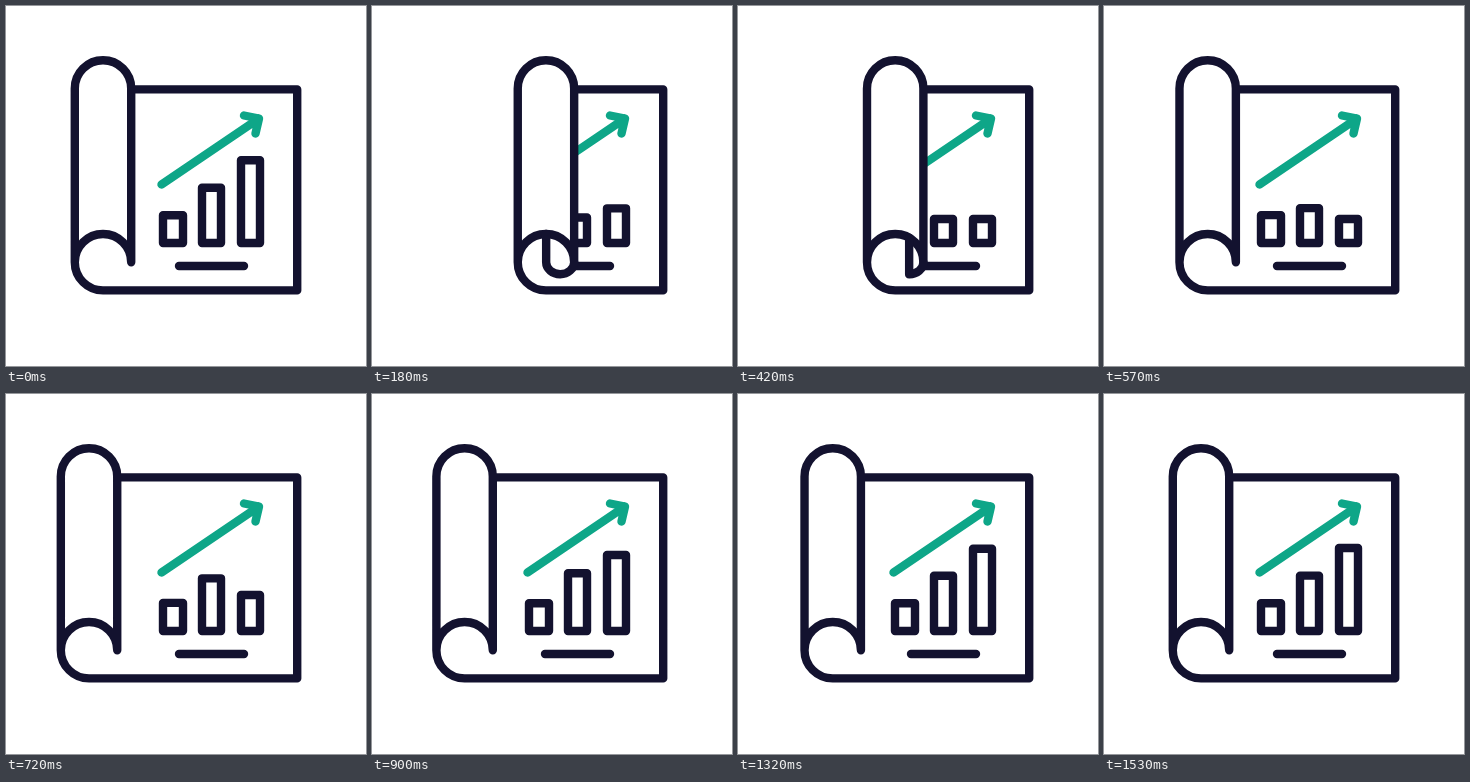
Recreate the animation shown at these times as an HTML page. Size 360 by 360 pixels, loop 1560 ms.

```html
<!DOCTYPE html>
<html lang="en">
<head>
<meta charset="utf-8">
<title>Chart scroll</title>
<style>
  html, body { margin: 0; width: 100%; height: 100%; overflow: hidden; background: #fff; }
  svg { display: block; width: 100vw; height: 100vh; }
  .ink { fill: none; stroke: #13122f; stroke-width: 8.4; stroke-linecap: round; stroke-linejoin: round; }
  .accent { stroke: #0ea688; }
</style>
</head>
<body>
<svg viewBox="0 0 360 360">
  <clipPath id="page"><rect id="reveal" y="0" width="360" height="360"/></clipPath>
  <g class="ink" clip-path="url(#page)">
    <path class="accent" d="M155.500 178.500L253 112.500M238 109.500L253 112.500L249.500 127.500"/>
    <path d="M173 260H238"/>
    <path id="bars"/>
  </g>
  <path id="sheet" class="ink"/>
  <path id="curl" class="ink"/>
</svg>
<script>
const LOOP = 1560, STEP = 30;
const R = 28.2, CURL = 14;
const TOP = 82.4, BOTTOM = 256.2, BASE = 237, LOW = 213;

const el = id => document.getElementById(id);
const clamp = (v, lo, hi) => Math.min(hi, Math.max(lo, v));
const ease = p => (1 - Math.cos(Math.PI * clamp(p, 0, 1))) / 2;

// Fading swings around rest, each shorter than the one before
function settle(s) {
  let level = 1, span = 370;
  for (const next of [-0.22, 0.17, 0]) {
    if (s < span) return level + (next - level) * ease(s / span);
    s -= span;
    level = next;
    span *= 0.62;
  }
  return 0;
}

// 0 at rest, 1 fully away; returns past rest by `over` at time `peak`
function swing(t, away, rise, peak, over) {
  if (t >= peak) return -over * settle(t - peak);
  return ease(t / away) - (1 + over) * ease((t - peak + rise) / rise);
}

const rollX = t => 97 + 94 * swing(t, 250, 450, 700, 0.15);

// Each bar is taller than the last and pops up a little later
function barPath(i, t) {
  const x = 157 + 39 * i, w = i ? 19 : 20;
  const rest = 209.2 - 27.5 * i;
  const y = rest + (LOW - rest) * swing(t, 170 + 40 * i, 420, 640 + 190 * i, 0.09);
  return `M${x} ${BASE}V${y}h${w}V${BASE}Z`;
}

// Inner winding: an arc that wraps further as the roll moves right
function curlPath(cx) {
  const angle = clamp((cx - 140) * 5.29, 0, 180) * Math.PI / 180;
  if (!angle) return "";
  const right = cx + R, ry = CURL - 2;
  const x = right - CURL + CURL * Math.cos(angle);
  const y = BOTTOM + ry * Math.sin(angle);
  const top = BOTTOM - Math.sqrt(Math.max(0, R * R - (x - cx) ** 2));
  return `M${right} ${BOTTOM}A${CURL} ${ry} 0 0 1 ${x} ${y}V${top}`;
}

function draw(t) {
  const cx = rollX(t), left = cx - R, right = cx + R;
  el("reveal").setAttribute("x", right);
  el("bars").setAttribute("d", [0, 1, 2].map(i => barPath(i, t)).join(""));
  el("sheet").setAttribute("d",
    `M${right} 83.400H291.200V284.400H${cx}A${R} ${R} 0 0 1 ${left} ${BOTTOM}` +
    `V${TOP}A${R} ${R} 0 0 1 ${right} ${TOP}V${BOTTOM}` +
    `A${R} ${R} 0 0 0 ${left} ${BOTTOM}`);
  el("curl").setAttribute("d", curlPath(cx));
}

const start = performance.now();
function tick() {
  const t = (performance.now() - start) % LOOP;
  draw(Math.floor(t / STEP) * STEP);
  requestAnimationFrame(tick);
}
tick();
</script>
</body>
</html>
```
